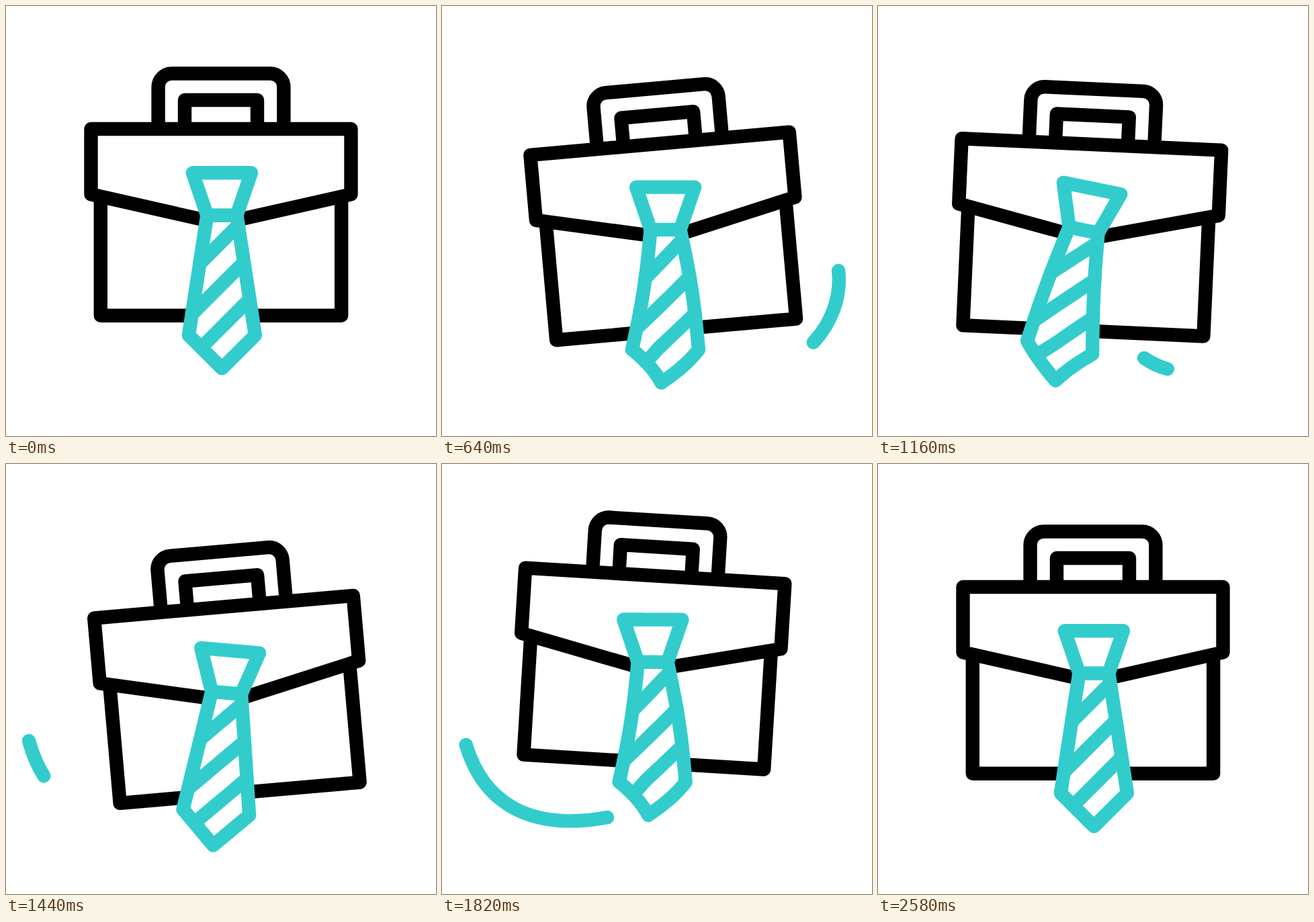
An HTML page for the animation above (3560 ms loop, 640 by 640 pixels).

```html
<!DOCTYPE html>
<html lang="en">
<head>
<meta charset="utf-8">
<title>Briefcase and tie</title>
<style>
  html, body { margin: 0; width: 100%; height: 100%; overflow: hidden; background: #fff; }
  svg { display: block; width: 100%; height: 100%; }
  path { stroke-width: 20.4; stroke-linecap: round; stroke-linejoin: round; fill: none; }
  .case { stroke: #000; }
  .teal { stroke: #33cccc; }
  .solid { fill: #fff; }
  .flat { stroke-linecap: butt; }
</style>
</head>
<body>
<svg viewBox="0 0 640 640">
  <path id="rightArc" class="teal" pathLength="1" d="M590 394C600 480 515 563 430 540Q412 535 396 524"/>
  <path id="leftArc" class="teal" pathLength="1" d="M34 412C58 500 125 548 246 526"/>
  <g id="briefcase">
    <path class="case flat" d="M226.6 183V120.5A20 20 0 0 1 246.6 100.5H393.4A20 20 0 0 1 413.4 120.5V183"/>
    <path class="case flat" d="M266 183V140H374V183"/>
    <path class="case flat" d="M140.8 284V460.7H499.2V284"/>
    <path class="case solid" d="M126.5 183H513.5V280.3L320 324L126.5 280.3Z"/>
    <g id="tie">
      <path id="blade" class="teal solid"/>
      <path id="stripes" class="teal"/>
      <path id="knot" class="teal solid"/>
    </g>
  </g>
</svg>
<script>
const LOOP = 3560;
const $ = id => document.getElementById(id);

// The tie is symmetric about CENTER; each half width belongs to one height.
const CENTER = 321.4;
const TOP = { y: 248.3, half: 43.6 };
const NECK = { y: 311.5, half: 22 };
const TAIL = { y: 490, half: 49.5 };
const TIP = { y: 539.4, half: 0 };

const mix = (a, b, u) => a + (b - a) * u;
const clamp = u => Math.min(1, Math.max(0, u));
const smooth = u => u * u * (3 - 2 * u);
const progress = (time, from, to) => clamp((time - from) / (to - from));

// Eases from rest through each [duration, value] in turn.
function sway(time, start, ...moves) {
  let value = 0;
  for (const [duration, next] of moves) {
    value = mix(value, next, smooth(progress(time, start, start + duration)));
    start += duration;
  }
  return value;
}

const side = (level, sign) => [CENTER + sign * level.half, level.y];

function halfWidth(y) {
  const [a, b] = y < TAIL.y ? [NECK, TAIL] : [TAIL, TIP];
  return mix(a.half, b.half, (y - a.y) / (b.y - a.y));
}

// A 45 degree stripe meets both blade edges where x + y equals sum.
function stripe(sum) {
  return [-1, 1].map(sign => {
    let low = NECK.y, high = TIP.y;
    for (let i = 0; i < 30; i++) {
      const y = (low + high) / 2;
      if (CENTER + sign * halfWidth(y) + y < sum) low = y; else high = y;
    }
    return [sum - low, low];
  });
}

const blade = [side(NECK, -1), side(TAIL, -1), side(TIP, 1), side(TAIL, 1), side(NECK, 1), side(NECK, -1)];
const knot = [side(TOP, -1), side(TOP, 1), side(NECK, 1), side(NECK, -1), side(TOP, -1)];
const stripes = [0, 1, 2].map(i => stripe(672 + 63.5 * i));

// Bows the blade sideways, curls its tip and lets the top edge sag.
function warp(x, y, bend) {
  const u = (y - NECK.y) / (TAIL.y - NECK.y);
  const v = (y - TAIL.y) / (TIP.y - TAIL.y);
  let dx = 0, dy = 0;
  if (v > 0) dx = 18 * v * (1 - v) - 6 * v;
  else if (u > 0) dx = 3.5 * Math.sin(Math.PI * u);
  else if (u < -0.9) dy = 2 * (1 - ((x - CENTER) / TOP.half) ** 2);
  return `${(x + bend * dx).toFixed(2)} ${(y + bend * dy).toFixed(2)}`;
}

function outline(points, bend) {
  const steps = 10, out = [warp(...points[0], bend)];
  for (let i = 1; i < points.length; i++) {
    const [ax, ay] = points[i - 1], [bx, by] = points[i];
    for (let s = 1; s <= steps; s++) {
      out.push(warp(mix(ax, bx, s / steps), mix(ay, by, s / steps), bend));
    }
  }
  return 'M' + out.join('L');
}

function trim(path, start, end) {
  const length = end - start;
  path.style.display = length > 0 ? '' : 'none';
  path.setAttribute('stroke-dasharray', length + ' 3');
  path.setAttribute('stroke-dashoffset', -start);
}

function render(time) {
  const lift = sway(time, 200, [295, 39], [405, -18.5], [400, 39], [550, -17], [410, 0]);
  const tilt = sway(time, 355, [275, -5.1], [400, 5.1], [402, -5], [398, 3.5], [535, 0]);
  const swing = sway(time, 200, [700, 7.4], [500, 10.2], [530, -5], [660, 0]);
  const bend = sway(time, 200, [440, 1], [510, -0.6], [670, 1], [480, 0]);

  $('briefcase').setAttribute('transform', `translate(0 ${lift}) rotate(${tilt} 320 137)`);
  $('tie').setAttribute('transform', `rotate(${swing} ${CENTER} 263)`);
  $('blade').setAttribute('d', outline(blade, bend) + 'Z');
  $('knot').setAttribute('d', outline(knot, bend) + 'Z');
  $('stripes').setAttribute('d', stripes.map(line => outline(line, bend)).join(''));

  trim($('rightArc'), progress(time, 810, 1215), progress(time, 480, 880));
  trim($('leftArc'), progress(time, 1812, 2210), progress(time, 1345, 1800));
}

const began = performance.now();
function tick() {
  render((performance.now() - began) % LOOP);
  requestAnimationFrame(tick);
}
tick();
</script>
</body>
</html>
```
